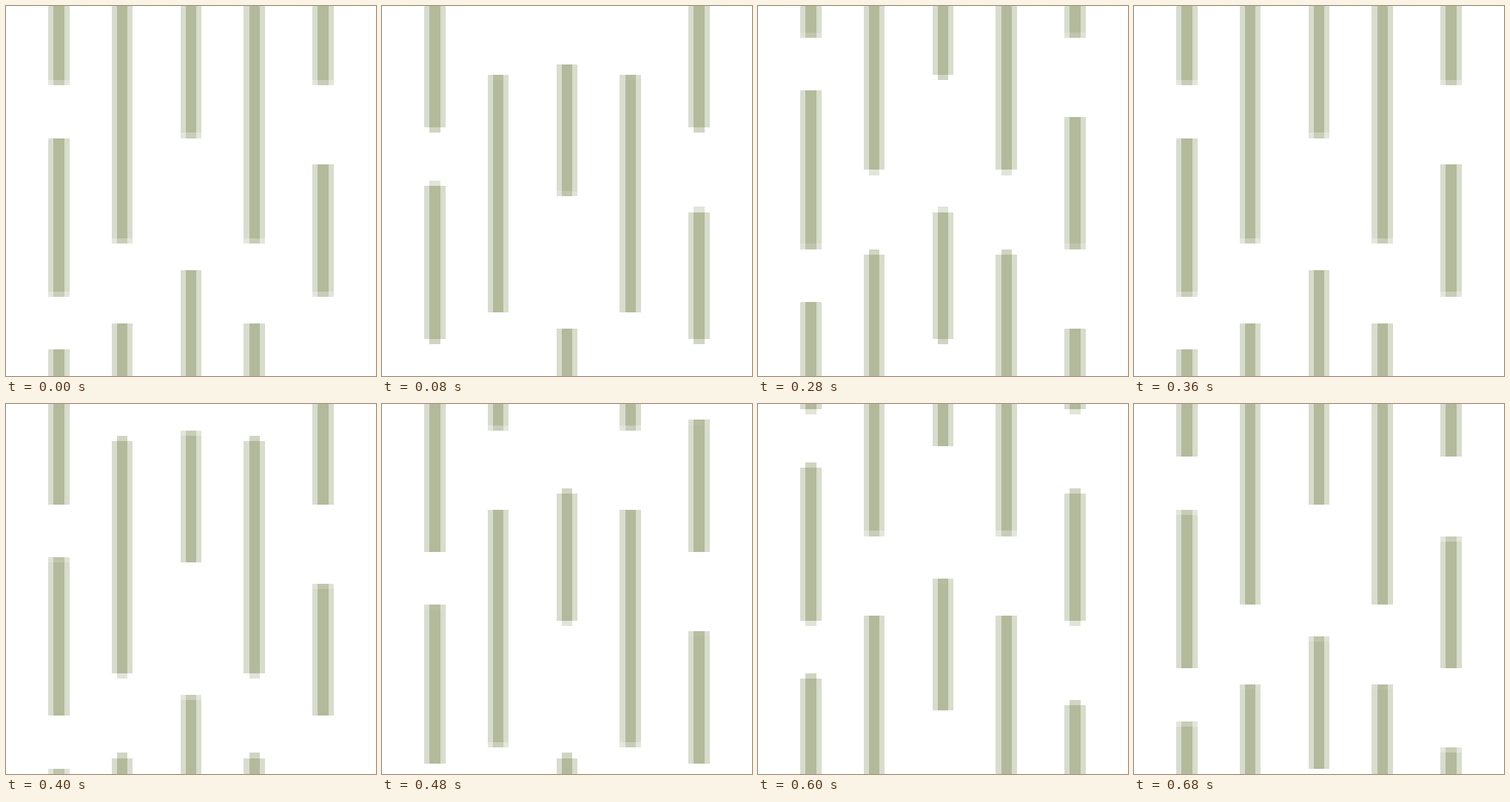
These frames come from a looping animation (500 px wide and 500 px high, 0.72 s). An HTML page with a canvas:

```html
<!DOCTYPE html>
<html lang="en">
<head>
<meta charset="utf-8">
<title>Falling dashes</title>
<style>
  html, body { margin: 0; height: 100%; overflow: hidden; background: #fff; }
  canvas { display: block; width: 500px; height: 500px; image-rendering: pixelated; }
</style>
</head>
<body>
<canvas width="70" height="70"></canvas>
<script>
const SIZE = 70, STEPS = 18, STEP_MS = 40;
const MIN_COVER = 0.33; // fainter edge cells stay empty
const ctx = document.querySelector('canvas').getContext('2d');

// Distances in grid cells; each column moves two periods per loop.
const columns = [
  { x: 8,  top: 24.72, length: 30, period: 40 },
  { x: 20, top: 59.72, length: 45, period: 60 },
  { x: 33, top: 49.72, length: 25, period: 50 },
  { x: 45, top: 59.72, length: 45, period: 60 },
  { x: 58, top: 29.72, length: 25, period: 40 },
];

function cells(x, y, width, cover) {
  if (cover < MIN_COVER) return;
  ctx.globalAlpha = cover;
  ctx.fillRect(x, y, width, 1);
}

function drawDash(x, top, bottom) {
  for (let y = Math.max(0, Math.floor(top)); y < Math.min(SIZE, bottom); y++) {
    const cover = Math.min(y + 1, bottom) - Math.max(y, top);
    cells(x, y, 1, cover / 2);
    cells(x + 1, y, 2, cover);
    cells(x + 3, y, 1, cover / 2);
  }
}

function draw(now) {
  const step = Math.floor(now / STEP_MS) % STEPS;
  ctx.clearRect(0, 0, SIZE, SIZE);
  ctx.fillStyle = '#b2ba9b';
  for (const { x, top, length, period } of columns) {
    const shift = (top + 2 * period * step / STEPS) % period;
    for (let y = shift - period; y < SIZE; y += period) drawDash(x, y, y + length);
  }
}

const start = performance.now();
function tick() {
  draw(performance.now() - start);
  requestAnimationFrame(tick);
}
tick();
</script>
</body>
</html>
```
